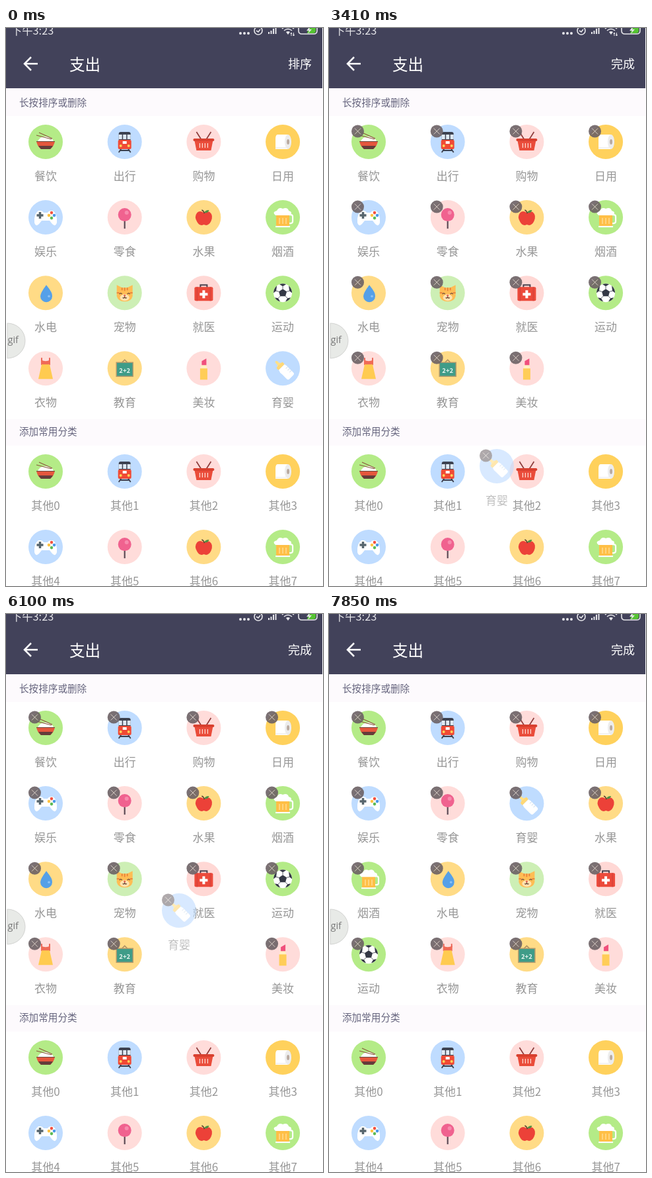
Animation of 480x843 px, one loop 8000 ms. Source, as an HTML page:

```html
<!DOCTYPE html>
<html lang="zh-CN">
<head>
<meta charset="utf-8">
<style>
  html, body { margin: 0; width: 100%; height: 100%; overflow: hidden; background: #fff; }
  svg { display: block; width: 480px; height: 843px; }
  text { font-family: "Noto Sans CJK SC", "Noto Sans CJK", "Noto Sans", sans-serif; }
  .label { font-size: 17px; fill: #969696; text-anchor: middle; }
  .section { font-size: 14.6px; fill: #66657e; }
</style>
</head>
<body>
<svg viewBox="0 0 480 843">
  <rect width="480" height="843" fill="#fff"/>
  <rect y="91" width="479" height="42" fill="#fdfafd"/>
  <rect y="591" width="479" height="40" fill="#fdfafd"/>
  <text class="section" x="20" y="117.500">长按排序或删除</text>
  <text class="section" x="20" y="615">添加常用分类</text>

  <rect width="479" height="91" fill="#42425a"/>
  <path d="M48 54H29M38 44L28 54L38 64" fill="none" stroke="#fff" stroke-width="2.500"/>
  <circle id="ripple" cx="445" cy="54" r="0" fill="#fff"/>
  <g fill="#fff">
    <text x="96" y="63.500" font-size="23.500">支出</text>
    <text id="action" x="463" y="61" font-size="18" text-anchor="end"></text>
  </g>

  <g fill="#e6e6ea">
    <text x="8" y="9.500" font-size="16.300">下午3:23</text>
    <circle cx="355" cy="8" r="2"/><circle cx="361" cy="8" r="2"/><circle cx="367" cy="8" r="2"/>
    <path d="M397 9h2v-3h-2zM400.500 9h2v-5h-2zM404 9h2v-8h-2zM407.500 9h2v-10h-2z"/>
    <path d="M427 10l-3-4q3-2 6 0z"/>
    <g fill="none" stroke="#e6e6ea" stroke-width="1.600">
      <circle cx="382" cy="4" r="6"/><path d="M379 4l3 2l3-4"/>
      <path d="M421 4q6-5 12 0M418 1q9-7 18 0"/>
      <path d="M448-4h18q5 0 5 5v3q0 5-5 5h-18q-5 0-5-5v-3q0-5 5-5"/>
    </g>
    <path id="traffic" d="M432 7v5M430.800 9l1.200-2l1.200 2M435.500 7v5M434.300 10l1.200 2l1.200-2" fill="none" stroke="#e6e6ea"/>
    <path d="M458 0h11v4q0 4-4 4h-9z" fill="#55c332"/>
    <path d="M460-2l-5 6h4l-2 5l6-7h-4l2-4z"/>
  </g>

  <g id="cells"></g>
  <path d="M2 446A27 26.500 0 0 1 2 499Z" fill="#e8eae7" stroke="#d2d3d1"/>
  <text x="2.500" y="476" font-size="14.500" fill="#777" style="font-family:'Open Sans',sans-serif">gif</text>
</svg>

<script>
const LOOP = 8000;
const BLUE = '#bfdcff', PINK = '#ffdcda', GREEN = '#b4eb87', AMBER = '#ffdb86';

// name, disc colour, artwork centred on the disc
const categories = [
  ['餐饮', GREEN, `<path d="M-12-1Q-8-9 1-8T12-1Z" fill="#fff"/>
    <path d="M-14-10L9-4M-10-14L10-5" stroke="#8a5a3c" stroke-width="1.200"/>
    <path d="M-14-1H14Q13 6 7 11H-7Q-13 6-14-1" fill="#e4573d"/>
    <path d="M-14-1H14V0H-14Z" fill="#6b4a40"/><path d="M-11 6H11Q9 9 7 11H-7Q-9 9-11 6" fill="#653c3a"/>`],
  ['出行', BLUE, `<path d="M-5 10L-9 16M5 10L9 16M-7 13H7" stroke="#3d3f4d" stroke-width="1.800"/>
    <path d="M-9-3V-12Q-9-15-6-15H6Q9-15 9-12V-3Z" fill="#3d4250"/>
    <path d="M-9-11H-4V-4H-9ZM-2.500-11H2.500V-4H-2.500ZM4-11H9V-4H4Z" fill="#dfeaf5"/>
    <rect x="-10" y="-3" width="20" height="14" rx="2" fill="#f04a35"/>
    <rect x="-3" y="-1" width="6" height="4" fill="#fff"/>
    <circle cx="-6" cy="6" r="2" fill="#ffd257"/><circle cx="6" cy="6" r="2" fill="#ffd257"/>`],
  ['购物', PINK, `<path d="M-11-15L-4-4M11-15L4-4" stroke="#8d3c3b" stroke-width="1.700"/>
    <path d="M-14-2H14L11 13H-11Z" fill="#ea4c3a"/><rect x="-16" y="-5" width="32" height="4" rx="2" fill="#d8402f"/>
    <path d="M-6 2V9M-2 2V9M2 2V9M6 2V9" stroke="#ffd9d0" stroke-width="1.300"/>`],
  ['日用', '#ffd15c', `<path d="M-8-11H8V11H-11V-4Q-11-11-8-11" fill="#fff"/>
    <path d="M-11 9H5" stroke="#e6e6e6"/><ellipse cx="8" cy="0" rx="5" ry="11" fill="#ececec"/>
    <ellipse cx="8" cy="0" rx="2" ry="4" fill="#b9aaa0"/>`],
  ['娱乐', BLUE, `<path d="M-11-10Q-5-11-3-7H3Q5-11 11-10Q18-5 17 8Q15 15 10 10L6 5H-6L-10 10Q-15 15-17 8Q-18-5-11-10" fill="#fff"/>
    <path d="M-8.500-8V2M-13.500-3H-3.500" stroke="#58666e" stroke-width="3.500"/>
    <circle cx="9" cy="-7" r="2.300" fill="#f25240"/><circle cx="9" cy="1" r="2.300" fill="#5dbb55"/>
    <circle cx="5" cy="-3" r="2.300" fill="#ffc341"/><circle cx="13" cy="-3" r="2.300" fill="#4b99e8"/>`],
  ['零食', PINK, `<path d="M0 4V17" stroke="#5d4c56" stroke-width="2.200"/>
    <circle cy="-4" r="10" fill="#f0628f"/><circle cx="3" cy="-7" r="3" fill="#f78bad"/>`],
  ['水果', AMBER, `<path d="M0-7Q-6-11-10-7Q-15-1-10 7Q-6 14 0 11Q7 14 11 6Q15-3 9-8Q5-10 0-7" fill="#ec4138"/>
    <path d="M1-6Q0-10-3-11" fill="none" stroke="#5c4033" stroke-width="1.600"/>
    <path d="M1-7Q2-11 8-11Q7-6 1-7" fill="#4f8f45"/>`],
  ['烟酒', GREEN, `<path d="M9-4H12Q15-4 15-1V6Q15 9 12 9H9" fill="none" stroke="#fff" stroke-width="2.200"/>
    <rect x="-10" y="-5" width="20" height="18" rx="1.500" fill="#ffbf46"/>
    <path d="M-5 1V10M0 1V10M5 1V10" stroke="#ffd581" stroke-width="2"/>
    <path d="M-11-3Q-17-8-9-10Q-6-16 0-13Q7-16 9-10Q16-8 11-3Z" fill="#fff"/><path d="M-11 14H11" stroke="#fff" stroke-width="2"/>`],
  ['水电', AMBER, `<path d="M1-12Q11 0 10 5A9 9 0 0 1-8 5Q-8 0 1-12" fill="#55a0e8"/>
    <circle cx="5" cy="5" r="1.800" fill="#8cc2f5"/>`],
  ['宠物', '#cdefb5', `<path d="M-12-12L-4-8H4L12-12V5Q10 13 0 13T-12 5Z" fill="#ffbd54"/>
    <path d="M0-8V-3M-4-8V-4M4-8V-4M-12 0H-8M12 0H8" stroke="#e8803c" stroke-width="1.800"/>
    <ellipse cy="7" rx="7" ry="5" fill="#ffe3b0"/>
    <path d="M-8 2Q-6-1-4 2M4 2Q6-1 8 2M-3 7Q-1 9 0 6Q1 9 3 7" fill="none" stroke="#6a4638" stroke-width="1.300"/><circle cy="4" r="1.400" fill="#e5604f"/>`],
  ['就医', '#ffd8d5', `<path d="M-5-8V-12H5V-8" fill="none" stroke="#4a4350" stroke-width="2"/>
    <rect x="-14" y="-9" width="28" height="21" rx="2" fill="#ec4a3b"/>
    <path d="M-10-9V12M10-9V12" stroke="#d8423a" stroke-width="1.500"/>
    <path d="M0-4V8M-6 2H6" stroke="#fff" stroke-width="4"/>`],
  ['运动', GREEN, `<circle r="14" fill="#fff"/><g fill="#343845"><path d="M0-6L6-2L4 5H-4L-6-2Z"/>
    <path d="M-5-13Q0-15 5-13L0-10ZM9-11Q14-6 14 0L10-3ZM-9-11Q-14-6-14 0L-10-3ZM12 7Q9 12 4 13L7 8ZM-12 7Q-9 12-4 13L-7 8Z"/></g>
    <path d="M0-6V-10M6-2L10-3M-6-2L-10-3M4 5L7 8M-4 5L-7 8" stroke="#343845" stroke-width=".8"/>`],
  ['衣物', '#ffdedb', `<path d="M-6-16V-11M6-16V-11" stroke="#e85b4c" stroke-width="1.800"/>
    <path d="M-7-13Q0-9 7-13V-5H-7Z" fill="#f06a56"/><path d="M-6-6H6L11 16H-11Z" fill="#ffcb50"/>`],
  ['教育', AMBER, `<path d="M-4-9L0-13L4-9" fill="none" stroke="#a98a60" stroke-width="1.500"/>
    <rect x="-12.500" y="-9" width="25" height="21" fill="#3f9c88" stroke="#b39a6c" stroke-width="1.500"/>
    <text y="6.500" font-size="9.500" font-weight="700" fill="#e9f5f0" text-anchor="middle">2+2</text>`],
  ['美妆', PINK, `<path d="M-3-3V-11L4-15V-3Z" fill="#f0507c"/><rect x="-4.500" y="-5" width="9" height="6" fill="#fff0c4"/>
    <rect x="-5.500" y="0" width="11" height="17" fill="#ffcd58"/>`],
  ['育婴', BLUE, `<g transform="translate(1 1) rotate(-45)"><path d="M-2-11V-15Q0-19 2-15V-11L5-8H-5Z" fill="#ffe08a"/>
    <rect x="-6.500" y="-9" width="13" height="5" rx="1.500" fill="#ffd877"/>
    <path d="M-6-4H6Q8 0 7 5V14Q7 17 4 17H-4Q-7 17-7 14V5Q-8 0-6-4" fill="#fff"/>
    <path d="M3 2H7M3 6H7M3 10H7" stroke="#d3e0ee"/></g>`]
];

const BADGE = `<g class="badge" transform="translate(-16.500 -16)"><circle r="9.500" fill="#6c6064" opacity=".9"/>
  <path d="M-4.500-4.500L4.500 4.500M4.500-4.500L-4.500 4.500" stroke="#e4dad0" stroke-width=".9"/></g>`;

// [first step, last step, number of steps]: the picture holds between steps
const bursts = [[0, 0, 1], [910, 1590, 10], [2060, 2060, 1], [2660, 3410, 10], [3500, 4170, 8],
  [4270, 5130, 10], [5730, 6100, 6], [6200, 6490, 4], [6590, 6970, 5], [7070, 7360, 4], [7460, 7850, 5]];

// finger path of the dragged cell: time, x, y
const dragPath = [[2660, 419, 514.5], [2800, 412, 522], [3410, 254, 662], [3780, 192, 758], [4170, 179.5, 711],
  [4270, 191, 657], [4700, 270, 540], [5130, 292, 505], [5730, 292, 505], [6100, 262, 448], [6350, 190, 400],
  [6590, 150, 360], [6970, 97, 316], [7110, 140, 206], [7360, 371, 249], [7460, 360, 320], [7600, 340, 305], [7850, 299.4, 286.2]];

// free slot over time
const gaps = [[0, 15], [4750, 14], [6130, 10], [6300, 9], [6580, 5], [7450, 6]];
const MOVE_MS = 250;

const $ = id => document.getElementById(id);
const clamp = v => Math.min(1, Math.max(0, v));
const lerp = (a, b, k) => a + (b - a) * k;
const ease = k => (1 - Math.cos(Math.PI * clamp(k))) / 2;
const slot = (i, top = 172) => [60 + 119.7 * (i % 4), top + 114.1 * Math.floor(i / 4)];
const place = (node, [x, y]) => node.setAttribute('transform', `translate(${x} ${y})`);

function makeCell(index, label, badge = '') {
  const [, color, art] = categories[index];
  const cell = document.createElementNS('http://www.w3.org/2000/svg', 'g');
  cell.innerHTML = `<circle r="26" fill="${color}"/><g fill="none">${art}</g>${badge}<text class="label" y="57.500">${label}</text>`;
  $('cells').append(cell);
  return cell;
}

for (let i = 0; i < 8; i++) place(makeCell(i, '其他' + i), slot(i, 670));
const cells = categories.map(([name], i) => makeCell(i, name, BADGE));
const badges = document.querySelectorAll('.badge');
const dragged = cells.pop();

function hold(t) {
  const [start, end, steps] = bursts.findLast(b => t >= b[0]);
  if (t >= end) return end;
  const step = (end - start) / (steps - 1);
  return start + Math.floor((t - start) / step) * step;
}

function dragPoint(t) {
  const next = dragPath.findIndex(p => p[0] > t);
  if (next === 0) return slot(15);
  if (next < 0) return dragPath.at(-1).slice(1);
  const a = dragPath[next - 1], b = dragPath[next];
  const k = (t - a[0]) / (b[0] - a[0]);
  return [lerp(a[1], b[1], k), lerp(a[2], b[2], k)];
}

function cellPoint(i, t) {
  let point = slot(i);
  for (const [start, gap] of gaps) {
    if (t < start) break;
    const goal = slot(i < gap ? i : i + 1);
    const k = ease((t - start) / MOVE_MS);
    point = point.map((v, axis) => lerp(v, goal[axis], k));
  }
  return point;
}

function render(time) {
  const t = hold(time);
  const editing = t >= 1050;
  $('action').textContent = editing ? '完成' : '排序';
  badges.forEach(b => b.setAttribute('opacity', clamp((t - 1050) / 250)));

  $('ripple').setAttribute('r', 26 * ease((t - 880) / 350));
  $('ripple').setAttribute('opacity', t < 910 ? 0 : 0.2 * clamp((1580 - t) / 350));

  const traffic = t < 2060 || (t >= 3000 && t < 3700) || (t >= 4700 && t < 5900);
  $('traffic').setAttribute('opacity', +traffic);

  cells.forEach((cell, i) => place(cell, cellPoint(i, t)));
  place(dragged, dragPoint(t));
  dragged.setAttribute('opacity', t >= 2660 && t < 7850 ? 0.6 : 1);
}

const startTime = performance.now();
function tick() {
  render((performance.now() - startTime) % LOOP);
  requestAnimationFrame(tick);
}
tick();
</script>
</body>
</html>
```
